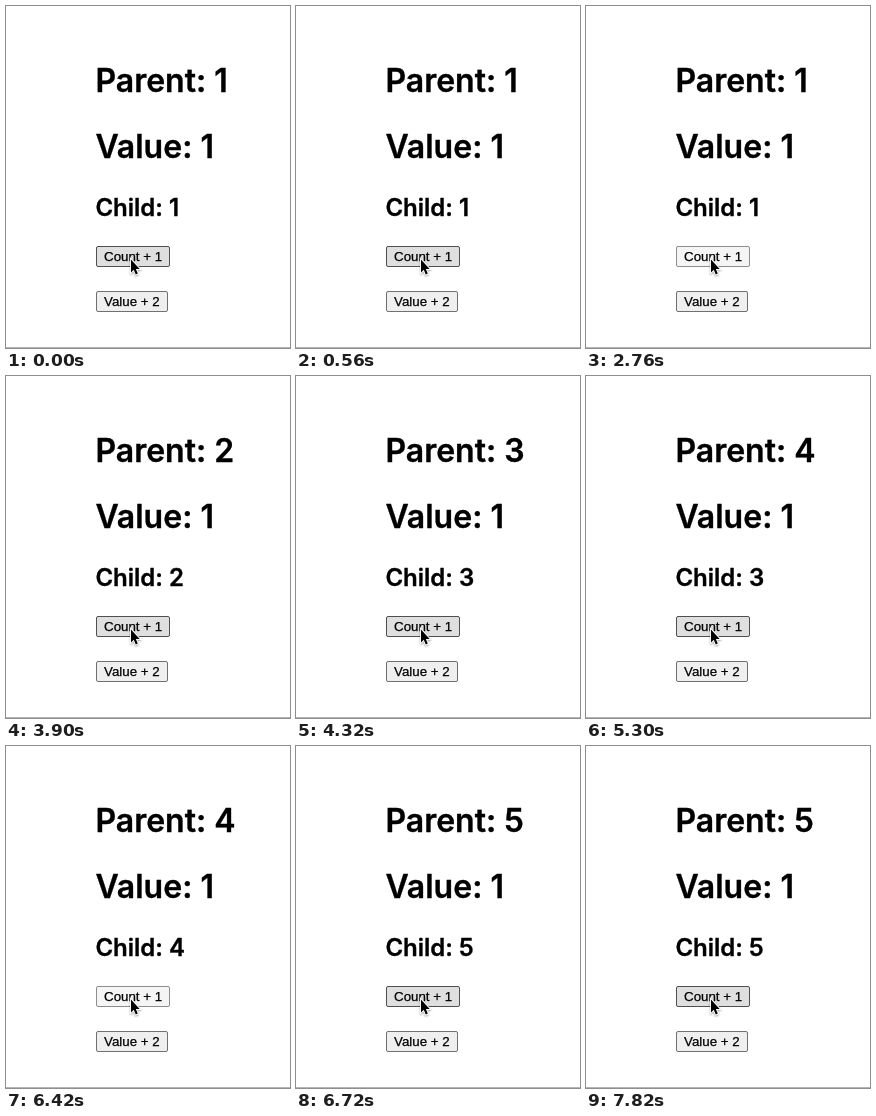
Animation of 284x342 px, one loop 8000 ms. Source, as an HTML page with a canvas:

```html
<!DOCTYPE html>
<html lang="en">
<head>
<meta charset="utf-8">
<title>Counter</title>
<style>
html, body { margin: 0; width: 100%; height: 100%; overflow: hidden; background: #fff; }
canvas { display: block; width: 284px; height: 342px; }
</style>
</head>
<body>
<canvas id="stage"></canvas>
<script>
const W = 284, H = 342, LOOP = 8000;
const HEAD = 'Inter, "Noto Sans", sans-serif';
const LABEL = '"Liberation Sans", Arial, sans-serif';
const canvas = document.getElementById('stage');
const ctx = canvas.getContext('2d');
const ratio = window.devicePixelRatio || 1;
canvas.width = W * ratio;
canvas.height = H * ratio;

// each press holds the button down; the child may update just after the parent
const clicks = [
  { down: 2760, up: 2940, lag: 0 },
  { down: 4020, up: 4320, lag: 0 },
  { down: 5020, up: 5300, lag: 20 },
  { down: 6420, up: 6700, lag: 20 }
];

const styles = {
  idle: { fill: '#efefef', edge: '#707070' },
  hover: { fill: '#e0dfe0', edge: '#4f4f4f' },
  active: { fill: '#f5f5f5', edge: '#8d8d8d' }
};

// a hairline outline gives the slightly heavier text rendering
function write(text, x, y, font, weight) {
  ctx.font = font;
  ctx.fillStyle = ctx.strokeStyle = '#000';
  ctx.lineWidth = weight;
  ctx.lineJoin = 'round';
  ctx.fillText(text, x, y);
  ctx.strokeText(text, x, y);
}

function heading(text, y, size) {
  write(text, 89.4, y, `600 ${size}px ${HEAD}`, 0.35);
}

function button(text, y, width, { fill, edge }) {
  ctx.beginPath();
  ctx.roundRect(90.5, y + 0.5, width - 1, 20, 1.5);
  ctx.fillStyle = fill;
  ctx.fill();
  ctx.strokeStyle = edge;
  ctx.lineWidth = 1;
  ctx.stroke();
  write(text, 98, y + 15, `13.333px ${LABEL}`, 0.25);
}

function cursor(x, y) {
  ctx.save();
  ctx.translate(x, y);
  ctx.scale(0.93, 0.98);
  const arrow = new Path2D('M0 0V13.2L3 10.4L5.1 15.3L7.3 14.4L5.2 9.6H9.3Z');
  ctx.lineJoin = 'miter';
  ctx.lineWidth = 2;
  ctx.strokeStyle = '#fff';
  ctx.shadowColor = 'rgba(0,0,0,.35)';
  ctx.shadowBlur = 2 * ratio;
  ctx.shadowOffsetY = ratio;
  ctx.stroke(arrow);
  ctx.shadowColor = 'transparent';
  ctx.fillStyle = '#000';
  ctx.fill(arrow);
  ctx.restore();
}

function draw(t) {
  const parent = 1 + clicks.filter(c => t >= c.up).length;
  const child = 1 + clicks.filter(c => t >= c.up + c.lag).length;
  const pressed = clicks.some(c => t >= c.down && t < c.up);

  ctx.setTransform(ratio, 0, 0, ratio, 0, 0);
  ctx.fillStyle = '#fff';
  ctx.fillRect(0, 0, W, H);
  heading(`Parent: ${parent}`, 86.3, 32);
  heading('Value: 1', 152.3, 32);
  heading(`Child: ${child}`, 210, 24);
  button('Count + 1', 240, 74, pressed ? styles.active : styles.hover);
  button('Value + 2', 285, 72, styles.idle);
  ctx.fillStyle = '#b4b4b4';
  ctx.fillRect(0, 341, W, 1);
  cursor(125, 253.5);
}

const start = performance.now();
function frame() {
  draw((performance.now() - start) % LOOP);
  requestAnimationFrame(frame);
}
frame();
</script>
</body>
</html>
```
